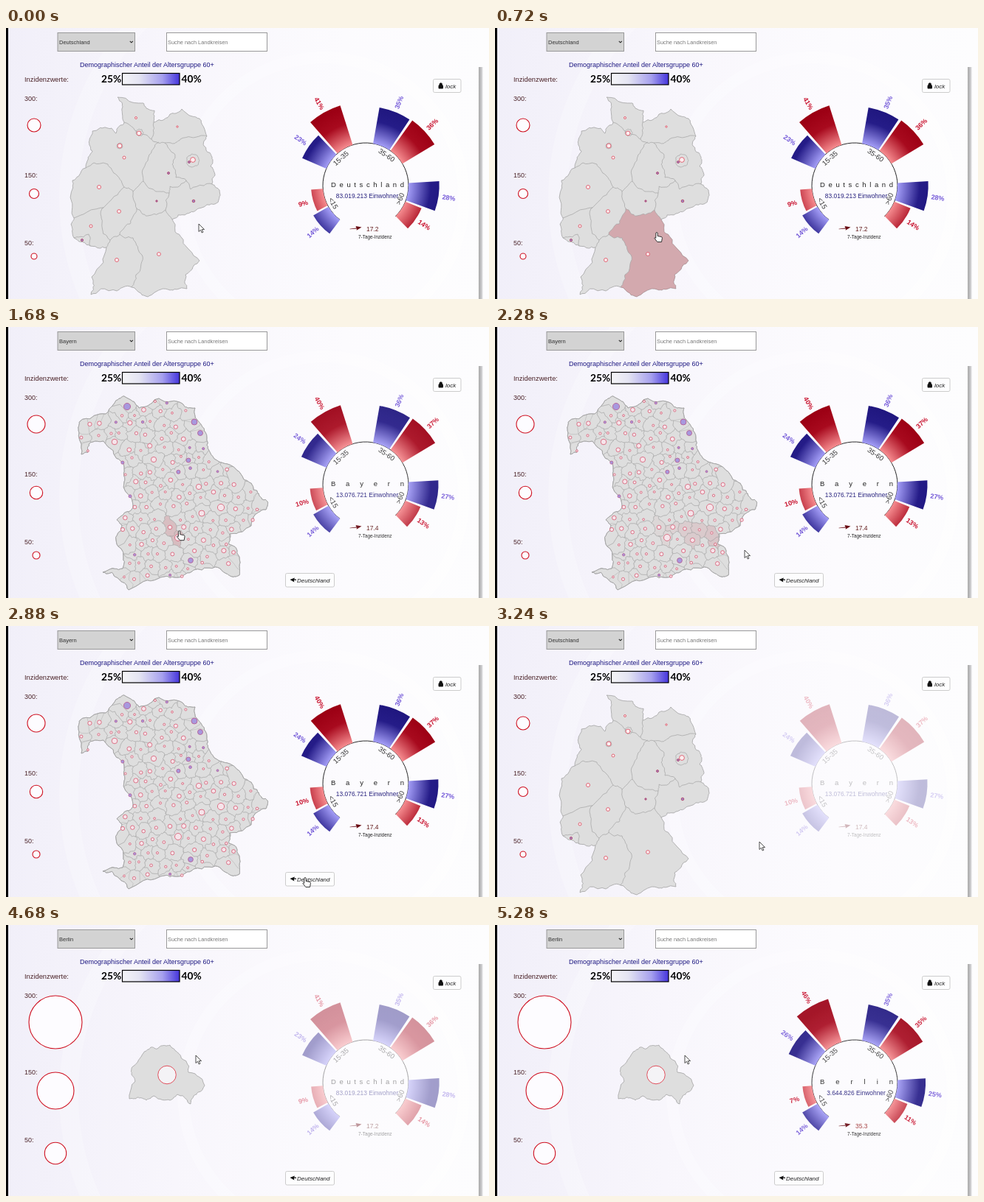
An HTML page that plays this animation: 654 by 368 pixels, repeating every 5400 ms.

```html
<!DOCTYPE html>
<html lang="de">
<head>
<meta charset="utf-8">
<title>Inzidenzkarte</title>
<style>
html, body { margin: 0; width: 100%; height: 100%; overflow: hidden; background: #fbfafd; }
svg { display: block; width: 654px; height: 368px; }
text { font-family: "Liberation Sans", Arial, sans-serif; }
.land { fill: #dedede; stroke: #a2a2a2; stroke-width: .8; }
.line { fill: none; stroke: #a2a2a2; stroke-width: .7; }
.cell { fill: none; stroke: #a8a8a8; stroke-width: .45; }
.hot { fill: #be4655; }
.pct { font-size: 9px; font-weight: bold; text-anchor: middle; }
.scale { font-family: Lato, "Open Sans", sans-serif; font-weight: 700; font-size: 13.7px; }
.age { font-size: 9.5px; fill: #333; text-anchor: middle; }
.btn { fill: #fdfdfe; stroke: #ccc; }
.it { font-style: italic; font-size: 8px; fill: #222; }
</style>
</head>
<body>
<svg viewBox="0 0 654 368" xmlns="http://www.w3.org/2000/svg">
  <defs>
    <linearGradient id="bg"><stop offset="0" stop-color="#f1eff9"/><stop offset=".35" stop-color="#f8f6fc"/><stop offset=".7" stop-color="#fcfbfe"/><stop offset="1" stop-color="#fdfdfe"/></linearGradient>
    <linearGradient id="bar"><stop offset="0" stop-color="#f5f5f7"/><stop offset=".3" stop-color="#e4e4f2"/><stop offset=".7" stop-color="#a6a0ee"/><stop offset="1" stop-color="#4434dc"/></linearGradient>
    <linearGradient id="edge"><stop offset="0" stop-color="#aaa"/><stop offset=".6" stop-color="#c4c4c6"/><stop offset="1" stop-color="#f6f6f8"/></linearGradient>
    <radialGradient id="blue" gradientUnits="userSpaceOnUse" cx="487" cy="214" r="110"><stop offset=".53" stop-color="#a29cf6"/><stop offset=".8" stop-color="#251c88"/><stop offset="1" stop-color="#1f167e"/></radialGradient>
    <radialGradient id="red" gradientUnits="userSpaceOnUse" cx="487" cy="214" r="110"><stop offset=".53" stop-color="#f58a8e"/><stop offset=".8" stop-color="#a80a1e"/><stop offset="1" stop-color="#9c0014"/></radialGradient>
  </defs>
  <rect width="654" height="368" fill="url(#bg)"/>
  <g fill="none" stroke="#fff" stroke-opacity=".2"><circle cx="430" cy="230" r="190" stroke-width="16"/><circle cx="430" cy="230" r="345" stroke-width="26"/></g>
  <rect width="3" height="368" fill="#000"/>
  <rect x="640" y="53" width="6" height="315" fill="url(#edge)"/>
  <rect x="70" y="6.5" width="104.5" height="25" fill="#d3d3d3" stroke="#999"/>
  <text id="pick" x="72" y="21.5" font-size="7.5" fill="#333"></text>
  <path d="M167.8 17.8l2 2 2-2" fill="none" stroke="#222" stroke-width="1.1"/>
  <rect x="217.5" y="6.5" width="136" height="25" fill="#fff" stroke="#999"/>
  <text x="219" y="21.5" font-size="7.4" fill="#777">Suche nach Landkreisen</text>
  <text x="100" y="53" font-size="9" fill="#1e1982">Demographischer Anteil der Altersgruppe 60+</text>
  <text class="scale" x="129" y="74">25%</text>
  <text class="scale" x="237.5" y="74">40%</text>
  <rect x="157.5" y="61.5" width="77.5" height="15.5" fill="url(#bar)" stroke="#000" stroke-width="1.2"/>
  <g fill="#4b2328" font-size="9">
    <text x="25" y="73" font-size="9.3">Inzidenzwerte:</text>
    <text x="25" y="99">300:</text><text x="25" y="203">150:</text><text x="25" y="295">50:</text>
  </g>
  <g id="legend" fill="#fdfcff" stroke="#cf1020" stroke-width="1.1"></g>
  <rect class="btn" x="578.5" y="69.5" width="37.5" height="18" rx="2"/>
  <path d="M586 78h5.5v4h-5.500zM587 78v-1.500a1.700 1.700 0 0 1 3.500 0v1.500" fill="#111" stroke="#111" stroke-width=".9"/>
  <text class="it" x="595" y="81.5">lock</text>
  <g id="maps"></g>
  <g id="back">
    <rect class="btn" x="378.5" y="334.5" width="66" height="18.5" rx="2"/>
    <path d="M384.500 343l6.500-2.500-.8 1.900 2.800.3v1.200l-3-.1.300 2.700z" fill="#111"/>
    <text class="it" x="394" y="347">Deutschland</text>
  </g>
  <g id="chart"></g>
  <g id="arrow" fill="#fff" stroke="#222" stroke-width=".8"><path d="M0 0v10.500l2.500-2.300 1.700 3.800 1.700-.8-1.700-3.600h3.300z"/></g>
  <g id="hand" fill="#fff" stroke="#222" stroke-width=".9" stroke-linejoin="round"><path d="M-1.200 .8a1.200 1.200 0 0 1 2.400 0v3.700l5 1q1.300.4 1.200 1.800l-.9 5.200h-5.700l-4-5.200q.4-1.300 2 0z"/></g>
</svg>
<script>
const LOOP = 5400, STEP = 120, CX = 487, CY = 214, R0 = 58;
const TO_BY = 790, TO_DE = 2894, TO_BE = 4400, OUT = 480, IN = 440;
const $ = id => document.getElementById(id);

function add(parent, tag, attrs, text) {
  const el = document.createElementNS("http://www.w3.org/2000/svg", tag);
  for (const k in attrs) el.setAttribute(k, attrs[k]);
  if (text) el.textContent = text;
  parent.appendChild(el);
  return el;
}
const pts = s => s.split(" ").map(p => p.split(",").map(Number));
const dist = (a, b) => Math.hypot(a[0] - b[0], a[1] - b[1]);
const hash = (x, y) => { const v = Math.sin(x * 12.9898 + y * 78.233) * 43758.5453; return v - Math.floor(v) - .5; };

// Midpoint displacement: the same two ends always give the same ragged line.
function split(a, b, depth, amp) {
  if (!depth) return [b];
  const d = dist(a, b) * amp, x = (a[0] + b[0]) / 2, y = (a[1] + b[1]) / 2;
  const m = [x + hash(x, y) * d, y + hash(y, x) * d];
  return [...split(a, m, depth - 1, amp), ...split(m, b, depth - 1, amp)];
}
const ragged = (p, amp = .32) => p.slice(1).reduce((all, b, i) => [...all, ...split(p[i], b, 3, amp)], [p[0]]);
const shape = (p, amp) => ragged([...p, p[0]], amp);
const path = p => "M" + p.map(v => v.map(n => n.toFixed(1)).join(" ")).join("L");

function inside(p, [x, y]) {
  let hit = false;
  p.forEach((a, i) => {
    const b = p[(i + 1) % p.length];
    if ((a[1] > y) !== (b[1] > y) && x < (b[0] - a[0]) * (y - a[1]) / (b[1] - a[1]) + a[0]) hit = !hit;
  });
  return hit;
}

// Germany: key points of the outline and of the state borders
const coast = pts("151,94 186,102 190,109 201,112 200,128 222,117 238,110 262,123 272,147");
const oder = pts("268,160 279,175 277,188 283,200 279,212");
const saxon = pts("289,220 283,239 268,243 245,252 225,260");
const alps = pts("238,285 262,316 243,335 245,354 222,356 192,365 170,352");
const west = pts("150,357 115,362 116,338 136,298 114,296 92,285 88,266 92,258 88,225 90,207 108,190 117,168 113,153 117,140 143,136 149,143 160,128 158,107");
const swabia = pts("170,352 176,335 184,308 172,285 154,280");
const frank = pts("154,280 168,266 177,245");
const thur = pts("177,245 197,254 216,247 225,260");
const bbWest = pts("279,212 250,219 244,207 230,203 225,185 229,172 215,156");
const bbNorth = pts("215,156 228,157 236,151 268,146 272,147");
const inner = ["160,128 177,142 197,151 215,156", "200,128 197,151", "207,155 194,172 186,208 203,222 221,224 222,215 244,207",
  "186,208 172,222 177,245", "221,224 216,247", "108,190 138,185 150,200 160,216 172,222", "160,216 132,244 92,258",
  "132,244 130,265 141,288 136,298", "141,288 154,280", "92,285 112,280 114,296"].map(pts);
const german = shape([...coast, ...oder, ...saxon, ...alps, ...west]);
const bavaria = shape([...thur, ...alps, ...swabia.slice(1), ...frank.slice(1, -1)]);
const brandenburg = shape([...bbNorth, ...oder, ...bbWest.slice(0, -1)]);
const bayern = shape(pts("153,97 160,94 180,110 207,97 240,105 256,110 262,130 272,150 274,166 292,184 322,207 333,214 342,226 354,237 352,248 337,255 332,270 303,281 302,295 316,312 316,337 306,339 290,328 254,330 228,340 205,342 166,357 150,340 131,333 158,328 150,295 157,270 150,262 172,245 160,210 160,190 132,155 113,158 111,170 102,173 98,140 100,128 135,118"));
const berlin = shape(pts("172,192 170,203 175,212 167,236 178,234 190,238 200,232 222,238 232,230 250,243 254,232 269,218 247,200 248,192 230,171 222,163 205,168 196,166 186,174"));

const [gDE, gBY, gBE] = [0, 1, 2].map(() => add($("maps"), "g"));
const layers = [gDE, gBY, gBE];
function dots(g, list, fill, stroke) {
  for (const [cx, cy, r] of list) add(g, "circle", { cx, cy, r, fill, stroke, "stroke-width": .8 });
}

add(gDE, "path", { d: path(german), class: "land" });
const states = [bavaria, brandenburg].map(poly => ({ poly, el: add(gDE, "path", { d: path(poly), class: "hot" }) }));
for (const b of [swabia, frank, thur, bbWest, bbNorth, ...inner]) add(gDE, "path", { d: path(ragged(b)), class: "line" });
for (const [x, y, r] of pts("253,180,9 181,142,5 154,160,4")) {
  const town = Array.from({ length: 7 }, (_, i) => [x + r * Math.cos(i * .9), y + r * Math.sin(i * .9)]);
  add(gDE, "path", { d: path(shape(town)), class: "line" });
}
// Markers: x,y,r
dots(gDE, pts("176,122,1.5 180,143,3 154,160,3 160,176,2 232,134,1.2 253,179,3.4 126,216,2.5 153,249,2.4 115,269,2 150,315,2.5 207,307,2.4"), "#fbeef0", "#dc4a5c");
dots(gDE, pts("248,182,1.5 220,197,1.5 204,235,1.2 254,235,1.8 103,288,1.6"), "#a08ccc", "#b03058");

// Bavaria: a few large markers, the rest on a jittered grid; districts are the Voronoi cells
const bigBlue = pts("164,108,4.6 255,129,4 263,144,3.5 247,181,3 250,317,3.4");
const bigRed = pts("147,156,3.8 200,180,3.6 261,217,3.6 265,253,4 291,245,4.6 233,286,4.5 222,272,2.8 257,274,2.4 158,275,2.6");
const small = [];
for (let row = 0; row < 17; row++) for (let col = 0; col < 16; col++) {
  const gx = 96 + 17 * (col + row % 2 / 2), gy = 100 + 16 * row;
  const x = gx + 9 * hash(gx, gy), y = gy + 9 * hash(gy, gx);
  if (inside(bayern, [x, y]) && [...bigBlue, ...bigRed].every(b => dist(b, [x, y]) > 10)) small.push([x, y, 1.4 + 7 * hash(x, y) ** 2]);
}
const seeds = [...bigBlue, ...bigRed, ...small];
const tinted = s => hash(s[1], s[0]) > .36;

function cell(s) {
  let poly = [[-60, -60], [60, -60], [60, 60], [-60, 60]].map(([x, y]) => [s[0] + x, s[1] + y]);
  for (const o of seeds) {
    if (o === s) continue;
    const side = p => dist(p, s) ** 2 - dist(p, o) ** 2;
    const next = [];
    poly.forEach((a, i) => {
      const b = poly[(i + 1) % poly.length], u = side(a), v = side(b), k = u / (u - v);
      if (u <= 0) next.push(a);
      if (u * v < 0) next.push([a[0] + (b[0] - a[0]) * k, a[1] + (b[1] - a[1]) * k]);
    });
    poly = next;
  }
  return shape(poly.map(p => p.map(Math.round)), .5);
}
add(add(gBY, "clipPath", { id: "byClip" }), "path", { d: path(bayern) });
add(gBY, "path", { d: path(bayern), class: "land" });
const cellBox = add(gBY, "g", { "clip-path": "url(#byClip)" });
const cells = seeds.map(s => {
  const poly = cell(s), d = path(poly);
  const el = add(cellBox, "path", { d, class: "hot" });
  add(cellBox, "path", { d, class: "cell" });
  return { poly, el };
});
add(gBY, "path", { d: path(bayern), class: "line" });
dots(gBY, [...bigRed, ...small.filter(s => !tinted(s))], "#f6e4ea", "#d65870");
dots(gBY, [...bigBlue, ...small.filter(tinted)], "#a898de", "#b85890");

add(gBE, "path", { d: path(berlin), class: "land" });
add(gBE, "circle", { cx: 218, cy: 203.5, r: 12.3, fill: "#f4f3f6", stroke: "#e0505c" });

const maps = [
  { name: "Deutschland", area: german, hot: states, glow: .35, radii: [9, 6.5, 4], x: 38 },
  { name: "Bayern", area: bayern, hot: cells, glow: .22, radii: [12, 8.7, 5], x: 41 },
  { name: "Berlin", area: berlin, hot: [], glow: 0, radii: [36, 25, 14.7], x: 67 }
];
const rings = [132, 225, 310].map(cy => add($("legend"), "circle", { cy }));

// Radial chart
const data = [
  { name: "Deutschland", people: "83.019.213", rate: "17.2", ink: "#641e1e", v: [14, 9, 23, 41, 35, 36, 28, 14] },
  { name: "Bayern", people: "13.076.721", rate: "17.4", ink: "#641e1e", v: [14, 10, 24, 40, 36, 37, 27, 13] },
  { name: "Berlin", people: "3.644.826", rate: "35.3", ink: "#a03434", v: [14, 7, 26, 46, 35, 35, 25, 11] }
];
function xy(deg, r) {
  const a = deg * Math.PI / 180;
  return `${(CX + r * Math.sin(a)).toFixed(2)} ${(CY - r * Math.cos(a)).toFixed(2)}`;
}
const turn = (deg, r, rot) => `translate(${xy(deg, r)}) rotate(${rot})`;
const mid = i => -118.7 + 76.6 * i;
add($("chart"), "path", { d: `M${xy(-143, R0)}A${R0} ${R0} 0 1 1 ${xy(136, R0)}`, fill: "none", stroke: "#111", "stroke-width": .9 });

const charts = data.map(d => {
  const g = add($("chart"), "g");
  d.v.forEach((v, i) => {
    const odd = i % 2, c = mid(i >> 1);
    const a = c + (odd ? 1 : -24.5), b = a + 23.5, m = (a + b) / 2;
    const r = Math.sqrt(R0 * R0 + 235 * v);
    add(g, "path", {
      d: `M${xy(a, R0)}L${xy(a, r)}A${r} ${r} 0 0 1 ${xy(b, r)}L${xy(b, R0)}A${R0} ${R0} 0 0 0 ${xy(a, R0)}Z`,
      fill: odd ? "url(#red)" : "url(#blue)"
    });
    add(g, "text", { class: "pct", y: 3.2, fill: odd ? "#c8102c" : "#7358d8", transform: turn(m, r + 14, m < 0 ? m + 90 : m - 90) }, v + "%");
  });
  ["<15", "15-35", "35-60", ">60"].forEach((s, i) => {
    const c = mid(i), rot = c < -90 ? c + 180 : c > 90 ? c - 180 : c;
    add(g, "text", { class: "age", y: 3.2, transform: turn(c, 50, rot) }, s);
  });
  const title = add(g, "text", { x: 440, y: 215.5, "font-size": 9.5, fill: "#222" }, d.name);
  title.style.letterSpacing = (99 - title.getComputedTextLength()) / (d.name.length - 1) + "px";
  add(g, "text", { x: 489, y: 231, "font-size": 8.45, fill: "#28237e", "text-anchor": "middle" }, d.people + " Einwohner");
  add(g, "path", { d: "M465.5 272.8l9-1.2-1-2.6 8 1.6-6.8 4.2 .2-2.4-9.2 .9z", fill: "#6a0c14" });
  add(g, "text", { x: 488, y: 276, "font-size": 8.5, fill: d.ink }, d.rate);
  add(g, "text", { x: 477, y: 286.3, "font-size": 6.4, fill: "#222" }, "7-Tage-Inzidenz");
  return g;
});

// Pointer keys: time,x,y
const keys = pts("0,261,266 240,261,266 660,219,278 1560,219,278 1860,258,276 2280,338,303 2700,405,342 2900,405,342 3240,358,293 3660,257,177 5400,257,177");
function pointer(t) {
  const i = keys.findIndex(k => k[0] > t), a = keys[i - 1], b = keys[i];
  const u = (t - a[0]) / (b[0] - a[0]);
  return [a[1] + (b[1] - a[1]) * u, a[2] + (b[2] - a[2]) * u];
}
const show = (el, on) => { el.style.display = on ? "" : "none"; };

function draw(t) {
  const level = t < TO_BY ? 0 : t < TO_DE ? 1 : t < TO_BE ? 0 : 2;
  const start = [0, TO_BY, TO_DE, TO_BE].filter(s => s <= t).pop();
  const map = maps[level];
  layers.forEach((g, i) => show(g, i === level));
  show($("back"), level > 0);
  $("pick").textContent = map.name;
  rings.forEach((c, i) => { c.setAttribute("cx", map.x); c.setAttribute("r", map.radii[i]); });

  // Regions light up under the pointer and fade after it leaves.
  const trail = [];
  for (let age = 0; age <= 760 && t - age >= start; age += 40) {
    const p = pointer(t - age);
    if (inside(map.area, p)) trail.push([p, age]);
  }
  for (const h of map.hot) {
    const last = trail.find(([p]) => inside(h.poly, p));
    h.el.setAttribute("opacity", last ? map.glow * (1 - last[1] / 800) : 0);
  }

  // The old chart fades out, then the new one fades in.
  const age = t - start, fresh = start > 0 && age >= OUT;
  const before = start === TO_DE ? 1 : 0;
  const shown = start === 0 || fresh ? level : before;
  const alpha = start === 0 ? 1 : fresh ? Math.min(1, (age - OUT) / IN) : 1 - age / OUT;
  charts.forEach((g, i) => show(g, i === shown));
  $("chart").setAttribute("opacity", alpha);

  const p = pointer(t);
  const onBack = level > 0 && p[0] > 378 && p[0] < 445 && p[1] > 334 && p[1] < 353;
  const hand = onBack || inside(map.area, p);
  show($("hand"), hand);
  show($("arrow"), !hand);
  $(hand ? "hand" : "arrow").setAttribute("transform", `translate(${p[0]} ${p[1]})`);
}
const t0 = performance.now();
function tick(now) {
  const t = Math.max(0, now - t0) % LOOP;
  draw(Math.floor(t / STEP) * STEP);
  requestAnimationFrame(tick);
}
draw(0);
requestAnimationFrame(tick);
</script>
</body>
</html>
```
